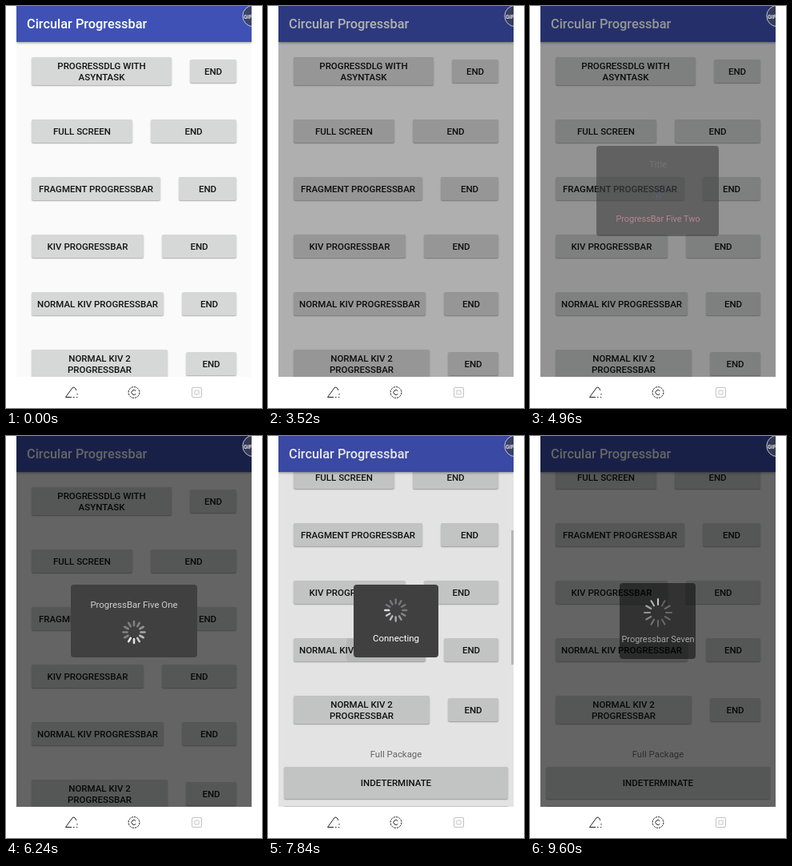
Recreate the animation shown at these times as an HTML page. Size 320 by 503 pixels, loop 9.76 s.

```html
<!DOCTYPE html>
<html lang="en">
<head>
<meta charset="utf-8">
<title>Circular Progressbar</title>
<style>
html, body { margin: 0; width: 100%; height: 100%; overflow: hidden; background: #fff; }
body { position: relative; font-family: Roboto, "Open Sans", sans-serif; }
#app { position: absolute; left: 13px; top: 0; width: 294px; height: 463.5px; overflow: hidden; background: #fafafa; }
#list { position: absolute; left: -13px; top: 0; width: 320px; height: 100%; }
#bar { position: absolute; left: 0; top: 0; width: 100%; height: 45px; background: #3f51b5;
  box-shadow: 0 1px 3px rgba(0,0,0,.4); color: #fff; font-weight: 500; font-size: 16.33px;
  line-height: 46px; text-indent: 13px; white-space: nowrap; }
.btn { position: absolute; display: flex; align-items: center; justify-content: center; overflow: hidden;
  box-sizing: border-box; padding-top: 2px;
  background: #d6d7d7; border-radius: 2px; box-shadow: 0 1px 1.5px rgba(0,0,0,.32); color: #121212;
  font-weight: 500; font-size: 11.5px; line-height: 13.4px; text-align: center; white-space: pre; }
.ripple { position: absolute; border-radius: 50%; background: rgba(0,0,0,.06); transform: translate(-50%, -50%); display: none; }
#label { position: absolute; left: 0; width: 100%; top: 496px; text-align: center; font-size: 11.43px; line-height: 14px; color: #707070; }
#thumb { position: absolute; right: 0; width: 3px; height: 168px; background: rgba(0,0,0,.2); }
#dim { position: absolute; inset: 0; background: #000; }
svg { position: absolute; left: 0; top: 0; }
</style>
</head>
<body>
<div id="app">
  <div id="list"><div id="label">Full Package</div></div>
  <div id="thumb"></div>
  <div id="bar">Circular Progressbar</div>
  <div id="dim"></div>
</div>
<svg id="over" width="320" height="503" viewBox="0 0 320 503" fill="none">
  <defs><clipPath id="edge"><rect x="13" width="294" height="463"/></clipPath></defs>
  <g clip-path="url(#edge)">
    <circle cx="309" cy="12.5" r="13.2" fill="#3a4058" fill-opacity=".8" stroke="#d4d4dc" stroke-width=".9"/>
    <text x="297" y="15.5" font-size="7" font-weight="500" fill="#fff">GIF</text>
  </g>
  <g stroke="#222" stroke-width="1">
    <path d="M74.5 489.5 L83 477.8 Q84.8 476 86.3 478 L88 481"/>
    <path d="M74.5 489.5 H82"/>
    <path d="M84 489.5 H89 V485" stroke-dasharray="1.5 2.5"/>
    <circle cx="160" cy="483.5" r="6.9" stroke-dasharray="2.6 1"/>
    <path d="M162.3 481.6 A3 3 0 1 0 162.3 485.4"/>
    <g stroke="#c2c2c2">
      <rect x="232.5" y="477.5" width="12" height="12" rx="1.5"/>
      <rect x="236" y="481" width="5" height="5" rx=".5"/>
    </g>
  </g>
</svg>
<script>
const LOOP = 9760, STEP = 160;
const $ = id => document.getElementById(id);
const over = $('over'), list = $('list');

function svg(parent, tag, attrs, text) {
  const el = document.createElementNS('http://www.w3.org/2000/svg', tag);
  for (const k in attrs) el.setAttribute(k, attrs[k]);
  if (text) el.textContent = text;
  return parent.appendChild(el);
}

// Buttons
function button(text, left, right, top, height) {
  const el = document.createElement('div');
  el.className = 'btn';
  el.textContent = text;
  el.style.cssText = `left:${left}px;width:${right - left}px;top:${top}px;height:${height}px`;
  return list.appendChild(el);
}
const rows = [
  ['PROGRESSDLG WITH\nASYNTASK', 207, 230, 64, 35],
  ['FULL SCREEN', 158, 181, 142],
  ['FRAGMENT PROGRESSBAR', 193, 216, 214],
  ['KIV PROGRESSBAR', 172, 195, 286],
  ['NORMAL KIV PROGRESSBAR', 197, 220, 358],
  ['NORMAL KIV 2\nPROGRESSBAR', 202, 225, 430, 35]
].map(([text, right, endLeft, top, height = 29]) => {
  button('END', endLeft, 288, top + (height - 29) / 2, 29);
  return button(text, 32, right, top, height);
});
button('INDETERMINATE', 20, 300, 519, 40);
button('', 20, 300, 568, 40);

// Touch ripples: row, start, duration
const ripples = [[0, 320, 480], [3, 4320, 320], [4, 5280, 320], [4, 7840, 320], [5, 9120, 320]]
  .map(([row, start, span]) => {
    const el = document.createElement('div');
    el.className = 'ripple';
    el.style.left = '117px';
    el.style.top = '50%';
    rows[row].appendChild(el);
    return { el, start, span };
  });

// Dialogs
function arcDialog() {
  const g = svg(over, 'g', {});
  const arc = svg(g, 'path', { stroke: '#ff4081', 'stroke-width': 3, 'stroke-linecap': 'square' });
  return { g, draw: t => arc.setAttribute('d', arcPath(t - 774)) };
}

function bezier(x, x1, y1, x2, y2) {
  const at = (s, a, b) => 3 * s * (1 - s) * (1 - s) * a + 3 * s * s * (1 - s) * b + s * s * s;
  let lo = 0, hi = 1;
  for (let i = 0; i < 20; i++) {
    const mid = (lo + hi) / 2;
    if (at(mid, x1, x2) < x) lo = mid; else hi = mid;
  }
  return at(lo, y1, y2);
}

function arcPath(ms) {
  const p = Math.max(0, ms) % 1333 / 1333;
  const head = p < .5 ? bezier(p * 2, .4, 0, .2, 1) : 1;
  const tail = p > .5 ? bezier(p * 2 - 1, .4, 0, .2, 1) : 0;
  const turn = p * 90 + ms * 720 / 6665 - 90;
  const point = deg => {
    const a = deg * Math.PI / 180;
    return `${160 + 15.6 * Math.cos(a)} ${218.5 + 15.6 * Math.sin(a)}`;
  };
  const from = tail * 270, to = Math.max(head * 270, from + .5);
  return `M${point(turn + from)} A15.6 15.6 0 ${to - from > 180 ? 1 : 0} 1 ${point(turn + to)}`;
}

// box: x, y, w, h; spin: cx, cy, inner, outer, width, colour, head tick, time of that head
function tickDialog(box, fill, texts, spin) {
  const g = svg(over, 'g', {});
  const [x, y, width, height] = box;
  svg(g, 'rect', { x, y, width, height, rx: 4, fill });
  for (const [text, ty, size, color] of texts)
    svg(g, 'text', { x: 160, y: ty, 'font-size': size, 'text-anchor': 'middle', fill: color }, text);
  const [cx, cy, inner, outer, w, color, head, at] = spin;
  const ticks = Array.from({ length: 12 }, (_, i) => svg(g, 'line', {
    x1: cx, x2: cx, y1: cy - inner, y2: cy - outer, stroke: color,
    'stroke-width': w, 'stroke-linecap': 'round', transform: `rotate(${i * 30} ${cx} ${cy})`
  }));
  const draw = t => {
    const now = head + Math.floor((t - at) / 83.3);
    ticks.forEach((tick, i) => {
      const age = ((now - i) % 12 + 12) % 12;
      tick.setAttribute('opacity', Math.max(.36, 1 - age * .11));
    });
  };
  return { g, draw };
}

const dialogs = {
  arc: arcDialog(),
  two: tickDialog([83, 175, 153, 113], '#404040',
    [['Title', 202, 11.43, '#606060'], ['ProgressBar Five Two', 270, 10.9, '#cc7c94']],
    [158.5, 231.5, 5, 9.5, 1.6, '#454c74', 6, 4960]),
  one: tickDialog([81, 186, 158, 91], '#404040',
    [['ProgressBar Five One', 215, 11.43, '#cfcfcf']],
    [160, 245.5, 8.5, 13.5, 2.6, '#f4f4f4', 7, 6240]),
  connect: tickDialog([107, 186, 106, 91], '#404040',
    [['Connecting', 257, 11.43, '#fff']],
    [159.7, 218, 8.5, 13.5, 2.4, '#dcdce6', 9, 7840]),
  seven: tickDialog([112, 184, 95, 95], 'rgba(0,0,0,.5)',
    [['Progressbar Seven', 258, 10.9, '#a8a8a8']],
    [160, 221, 10, 17, 2.1, '#c4c4c4', 12, 9600])
};

// time, dim, dialog opacity, dialog
const scenes = [
  [0, 0, 0], [800, .2, 1, 'arc'], [960, .6, 1, 'arc'], [3520, .3, 0], [3680, 0, 0],
  [4480, .1, 1, 'two'], [4640, .6, 1, 'two'], [4960, .41, .6, 'two'], [5120, 0, 0],
  [5440, .1, 1, 'one'], [5600, .6, 1, 'one'], [6400, .3, 0], [6560, 0, 0],
  [7840, .095, 1, 'connect'], [8000, .6, 1, 'connect'], [8320, .3, 0], [8480, 0, 0],
  [9280, .1, 1, 'seven'], [9440, .6, 1, 'seven']
];
// time, scroll offset, scrollbar opacity
const scrolls = [[0, 0, 0], [7200, 38, 1], [7360, 86, 1], [7520, 105, 1], [8000, 105, .5], [8160, 105, 0]];
const current = (table, t) => table.filter(row => row[0] <= t).pop();

function render(t) {
  const [, offset, thumb] = current(scrolls, t);
  list.style.transform = `translateY(${-offset}px)`;
  $('thumb').style.top = 46 + offset * 72 / 105 + 'px';
  $('thumb').style.opacity = thumb;

  const [, dim, alpha, name] = current(scenes, t);
  $('dim').style.opacity = dim;
  for (const key in dialogs) {
    const { g, draw } = dialogs[key];
    g.style.display = key === name ? '' : 'none';
    if (key === name) {
      g.style.opacity = alpha;
      draw(t);
    }
  }

  for (const { el, start, span } of ripples) {
    const age = t - start, on = age >= 0 && age < span;
    el.style.display = on ? 'block' : 'none';
    if (on) el.style.width = el.style.height = 104 + age * .6 + 'px';
  }
}

const begin = performance.now();
function frame() {
  const t = (performance.now() - begin) % LOOP;
  render(Math.floor(t / STEP) * STEP);
  requestAnimationFrame(frame);
}
frame();
</script>
</body>
</html>
```
